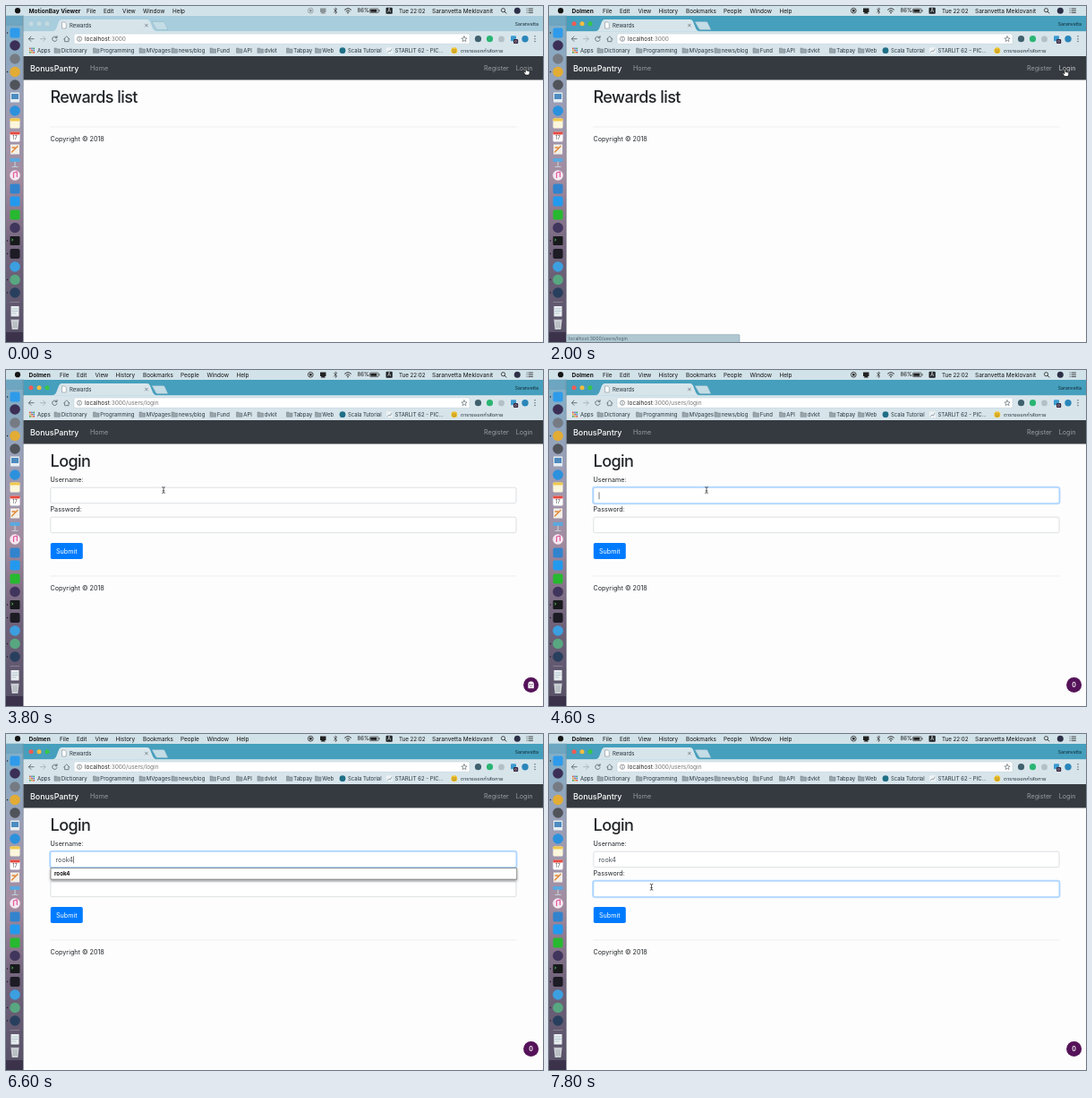
An HTML page for the animation above (8000 ms loop, 600 by 375 pixels).

```html
<!DOCTYPE html>
<html lang="en">
<head>
<meta charset="utf-8">
<title>Login demo</title>
<style>
  html, body { margin: 0; width: 100%; height: 100%; overflow: hidden; background: #fdfdfd; }
  svg { display: block; width: 100vw; height: 100vh; }
  text { font-family: Inter, Roboto, "Noto Sans", "Noto Sans Thai", sans-serif; white-space: pre; }
</style>
</head>
<body>
<svg id="stage" viewBox="0 0 600 375" xmlns="http://www.w3.org/2000/svg"></svg>
<script>
const STEP = 200, LOOP = 8000;
const INK = '#212529', FAINT = '#9a9da0';

// Markup helpers; text is placed by the middle of its capitals.
const text = (x, mid, s, size, fill = INK, more = '') =>
  `<text x="${x}" y="${mid + size * 0.36}" font-size="${size}" fill="${fill}" ${more}>${s}</text>`;
const rect = (x, y, w, h, fill, more = '') =>
  `<rect x="${x}" y="${y}" width="${w}" height="${h}" fill="${fill}" ${more}/>`;
const dot = (x, y, r, fill, more = '') => `<circle cx="${x}" cy="${y}" r="${r}" fill="${fill}" ${more}/>`;
const path = (d, fill, more = '') => `<path d="${d}" fill="${fill}" ${more}/>`;
const line = (d, color, w = 1, more = '') =>
  path(d, 'none', `stroke="${color}" stroke-width="${w}" stroke-linecap="round" stroke-linejoin="round" ${more}`);
const group = (id, body) => `<g id="${id}">${body}</g>`;

const defs = `<defs>
  <linearGradient id="wall" x1="0" y1="0" x2="0" y2="1">
    <stop offset="0" stop-color="#6ba7c2"/><stop offset=".25" stop-color="#8d91ab"/>
    <stop offset=".5" stop-color="#97798f"/><stop offset=".72" stop-color="#5c4a65"/>
    <stop offset="1" stop-color="#393149"/>
  </linearGradient>
  <filter id="drop" x="-5%" y="-20%" width="110%" height="160%">
    <feDropShadow dx="0" dy="1.5" stdDeviation="1.5" flood-opacity=".4"/>
  </filter>
</defs>`;

function dock() {
  const square = (y, c) => rect(4.5, y - 5.5, 11, 11, c, 'rx="2"');
  const round = (y, c) => dot(10, y, 5.8, c);
  const sheet = (y, c, top) => rect(4.5, y - 5.5, 11, 11, c, 'rx="1.5"') + rect(4.5, y - 5.5, 11, 3, top, 'rx="1"');
  return rect(0, 10, 20, 365, 'url(#wall)') + rect(0, 22, 19.3, 342, '#d9dbe6', 'opacity=".18"') +
    square(30, '#2e9bea') + round(44, '#3b2f55') + round(59, '#767b83') +
    round(73.5, '#e2ac35') + round(88, '#50545a') +
    rect(5, 96.5, 10, 11, '#e6edf2') + rect(6, 98, 8, 6, '#4d8cc0') +
    round(117, '#2c91dd') + sheet(131, '#fbf6dc', '#f1c84a') +
    sheet(146, '#fff', '#e5493f') + text(10, 147.5, '17', 5.5, '#444', 'text-anchor="middle"') +
    rect(5, 154.5, 10, 11, '#f2efe8') + line('M6.5 163L13 156.5M7 158H10', '#e28635', 1.4) +
    rect(4.5, 170, 11, 4, '#5aa8df') + line('M10 174V179M7 179.5H13', '#c5ccd3', 1.2) +
    round(189, '#f4e7f0') + line('M8.5 191.5V186L12.3 185.2V190.5', '#e4559a', 1.2) +
    square(204, '#3283cd') + square(218, '#2399ee') + square(233, '#27b92f') +
    round(247.5, '#40355c') + rect(4.5, 257, 11, 10, '#17191b', 'rx="1"') + line('M6.5 260L8 261L6.5 262', '#5fd36a', .7) +
    square(276.5, '#1d1b24') + round(291, '#3c9fe0') + round(305.5, '#58a780') + round(320, '#293f5e') +
    line('M5 330.5H15', '#a9a4b2', .5) +
    rect(5.5, 335, 9, 11.5, '#e8edf0') + line('M7 338H13M7 340.5H13M7 343H11', '#9fb5c0', .7) +
    path('M5.5 350H14.5L13.3 361H6.7Z', '#cfd4d8') + line('M5.3 350H14.7M8 352.5L8.5 359M10 352.5V359M12 352.5L11.5 359', '#9da3aa', .7) +
    [30, 73.5, 262, 276.5, 305.5, 320].map(y => dot(1.6, y, .7, '#1b1a22')).join('');
}

function menu(app, items) {
  return text(25.5, 5.3, app, 6.5, '#111', 'font-weight="700"') +
    items.map(([x, s]) => text(x, 5.3, s, 6.4, '#111')).join('');
}

function menuBar() {
  return rect(0, 0, 600, 10.7, '#d2e2e9') + dot(13, 5.2, 3.1, '#151515') +
    group('menuIdle', menu('MotionBay Viewer',
      [[90, 'File'], [109, 'Edit'], [130, 'View'], [153, 'Window'], [186, 'Help']])) +
    group('menuLive', menu('Dolmen', [[60, 'File'], [79, 'Edit'], [99.5, 'View'], [122.5, 'History'],
      [153, 'Bookmarks'], [195, 'People'], [224.5, 'Window'], [257.5, 'Help']])) +
    group('recorder', dot(340.3, 5.2, 2.9, 'none', 'stroke="#222" stroke-width=".8"') + rect(339, 3.9, 2.6, 2.6, '#222') +
      rect(351, 2.5, 6.5, 4.5, '#222') + path('M354.3 5L357 8.5H351.6Z', '#222')) +
    line('M366.5 3.5L369.8 7L368.2 8.5V2L369.8 3.5L366.5 7', '#222', .6) +
    line('M378.5 4.2Q382 1 385.5 4.2M380 5.8Q382 4 384 5.8', '#222', .9) + dot(382, 7.6, .8, '#222') +
    text(392.5, 5.3, '86%', 6, '#111') +
    rect(406.5, 3, 9.5, 4.6, 'none', 'rx=".8" stroke="#222" stroke-width=".6"') + rect(407.3, 3.8, 7, 3, '#222') + rect(416.6, 4.3, .8, 2, '#222') +
    rect(424.5, 1.7, 7.3, 7, '#20262a', 'rx="1"') + text(428.1, 5.2, 'A', 5.5, '#fff', 'text-anchor="middle"') +
    text(439, 5.3, 'Tue 22:02', 6.2, '#111') + text(476, 5.3, 'Saranvetta Meklovanit', 6.5, '#111') +
    dot(555.5, 4.7, 2.1, 'none', 'stroke="#222" stroke-width=".8"') + line('M557.1 6.3L558.9 8.1', '#222', .9) +
    dot(571.3, 5.2, 3.5, '#2d3048') +
    line('M584 3H588.5M584 5.2H588.5M584 7.4H588.5', '#222', .8) + line('M582 3H582.1M582 5.2H582.1M582 7.4H582.1', '#222', .8);
}

function bookmarks() {
  const folder = x => path(`M${x} 47H${x + 2.4}L${x + 3} 48H${x + 6.5}V52.3H${x}Z`, '#9aa6ac', 'stroke="#6d7a81" stroke-width=".5"');
  const names = [[54, 'Dictionary'], [97.5, 'Programming'], [149, 'MVpages'], [185, 'news/blog'], [228, 'Fund'],
    [257.5, 'API'], [281, 'dvkit'], [313.5, 'Tabpay'], [345.5, 'Web']];
  const hues = ['#d94b3d', '#e3a32f', '#3f9b54', '#3f7ed1'];
  let out = '';
  for (let i = 0; i < 9; i++) out += rect(26 + i % 3 * 2.2, 46.6 + (i / 3 | 0) * 2.2, 1.6, 1.6, hues[i * 3 % 4]);
  out += text(35, 49.7, 'Apps', 6, '#26323a');
  for (const [x, s] of names) out += folder(x) + text(x + 7.8, 49.7, s, 6, '#26323a');
  return out + dot(376, 49.7, 3.4, '#1f6f86') + text(382, 49.7, 'Scala Tutorial', 5.9, '#26323a') +
    rect(425, 46.3, 7, 7, '#eef2f4') + line('M426 52L428 50L429.4 51L431 48', '#6e8794', .7) +
    text(434.5, 49.7, 'STARLIT 62 - PIC...', 6, '#26323a') +
    dot(500.8, 49.7, 3.5, '#f0c22e') + dot(499.6, 49, .5, '#5a4510') + dot(502, 49, .5, '#5a4510') + line('M499 51Q500.8 52.3 502.6 51', '#5a4510', .5) +
    text(508, 49.7, 'ตารางออกกำลังกาย', 6, '#26323a');
}

function browser() {
  const bar = '#d7e5eb', icon = '#5b676d';
  const lights = (...c) => c.map((f, i) => dot(28 + i * 9, 19.7, 2.5, f)).join('');
  return rect(19.3, 11, 580.7, 364, '#fdfdfd') +
    group('frameIdle', rect(19.3, 10.7, 580.7, 18, '#a8cddd') + lights('#c4d9e2', '#c4d9e2', '#c4d9e2')) +
    group('frameLive', rect(19.3, 10.7, 580.7, 18, '#459fbd') + lights('#f25c54', '#f5bd3d', '#38c648')) +
    path('M163 17.5H175.5Q176.7 17.5 177.3 18.6L181 26.5H169.5Q168 26.5 167.3 25Z', '#c3dce5', 'stroke="#79a9bb" stroke-width=".4"') +
    path('M52 28.5Q55 28 56.2 25L59 17.5Q60 15 62 15H158Q160 15 161 17.5L164 25Q165.2 28 168 28.5Z', bar) +
    path('M62.5 18H65.7L67.2 19.5V25H62.5Z', '#fff', 'stroke="#6f7b81" stroke-width=".5"') +
    text(71, 21.6, 'Rewards', 6, '#26323a') + line('M155.5 20.2L158.3 23M158.3 20.2L155.5 23', icon, .7) +
    text(595, 20, 'Saranvetta', 5.2, '#12262f', 'text-anchor="end"') +
    rect(19.3, 28.3, 580.7, 28, bar) +
    line('M31 36.7H25.5M28 34L25.3 36.7L28 39.4', icon, .9) +
    line('M38.5 36.7H44M41.5 34L44.2 36.7L41.5 39.4', '#a5b3ba', .9) +
    line('M56.5 35A2.7 2.7 0 1 0 57 37.6M57 33.5V35.6H55', icon, .9) +
    line('M64.5 37L67.8 33.8L71 37M65.6 36.5V39.7H70V36.5', icon, .8) +
    rect(76, 31, 442, 11.3, '#fff', 'rx="1.6" stroke="#b9c9d0" stroke-width=".5"') +
    dot(82, 36.7, 2.6, 'none', 'stroke="#6a7378" stroke-width=".7"') + line('M82 36.5V38M82 35.2V35.3', '#6a7378', .7) +
    text(88, 36.7, 'localhost<tspan fill="#777">:3000<tspan id="urlPath"></tspan></tspan>', 6.5, '#222') +
    line('M512 33.7L512.9 35.8L515.1 36L513.4 37.4L514 39.6L512 38.4L510 39.6L510.6 37.4L508.9 36L511.1 35.8Z', '#657076', .7) +
    dot(527.5, 36.7, 3.6, '#40616d') + dot(540.5, 36.7, 3.6, '#2ab573') + dot(553.5, 36.9, 3.4, '#b5c0c5') +
    rect(564, 33.3, 6, 6, '#3b9bd0', 'rx="1"') + rect(567, 37, 5.2, 5, '#3a2740', 'rx="1"') + text(569.6, 39.5, '0', 4, '#fff', 'text-anchor="middle"') +
    dot(580, 36.7, 3.7, '#2a86ba') + [33.8, 36.7, 39.6].map(y => dot(591, y, .75, icon)).join('') +
    bookmarks() + line('M19.3 11V375', '#54616a', .4);
}

const heading = s => text(49.5, 102, s, 18, INK, 'font-weight="500" letter-spacing="-.55"');
const footer = y => line(`M49.5 ${y}H570`, '#e3e3e3', .6) + text(49.5, y + 13.5, 'Copyright © 2018', 7.2);
const field = (id, y) => rect(49, y - .5, 521.5, 18.5, 'none', `id="${id}Glow" rx="2.4" stroke="#bfdeff" stroke-width="2"`) +
  rect(49.8, y, 520.2, 17.5, '#fff', `id="${id}Box" rx="1.8" stroke-width=".6"`);

function page() {
  return rect(19.5, 56, 580.5, 26.5, '#343a40') +
    text(27, 69.6, 'BonusPantry', 8.9, '#fff', 'font-weight="500"') +
    text(94, 69.6, 'Home', 7.2, FAINT) + text(534, 69.6, 'Register', 7.2, FAINT) +
    text(569.7, 69.6, 'Login', 7.2, FAINT, 'id="loginLink"') +
    group('listPage', heading('Rewards list') + footer(135)) +
    group('loginPage', heading('Login') + text(49.5, 122, 'Username:', 7.2) + text(49.5, 155, 'Password:', 7.2) +
      field('user', 131.2) + field('pass', 164.2) + text(55.5, 140.3, '', 7.2, '#495057', 'id="typed"') +
      rect(0, 136.3, .6, 8, '#222', 'id="caret"') +
      rect(49.8, 193, 36, 18, '#007bff', 'rx="1.8"') + text(67.8, 202, 'Submit', 7.2, '#fff', 'text-anchor="middle"') +
      footer(230) + group('hints', '')) +
    group('badge', dot(586.6, 351.5, 8.5, '#551359') +
      group('ghost', path('M583.4 355.2V350.6Q583.4 347.6 586.6 347.6T589.8 350.6V355.2Z', '#fff') +
        dot(585.4, 351, .7, '#551359') + dot(587.8, 351, .7, '#551359') + line('M585.5 353.3H587.7', '#551359', .5)) +
      group('count', text(586.6, 351.5, '0', 7, '#fff', 'text-anchor="middle" font-weight="600"'))) +
    group('status', rect(19.5, 366.7, 193.5, 9, '#b0c8d2', 'rx="1" stroke="#7f99a4" stroke-width=".5"') +
      text(22, 370.7, 'localhost:3000/users/login', 5.2, '#4f626b'));
}

const cursors =
  group('arrow', path('M0 0V6.6L1.5 5.3L2.5 7.6L3.6 7.1L2.6 4.9H4.7Z', '#111', 'stroke="#fff" stroke-width=".5"')) +
  group('hand', path('M-.7 .5Q0 -.4 .7 .5V3L3.6 3.7Q4.4 4 4.2 5L3.5 8H-.6L-2.7 5Q-2.8 4 -1.8 4.3L-.7 5.2Z', '#fff', 'stroke="#111" stroke-width=".7"')) +
  group('beam', line('M-1.4 -3.4Q0 -3.4 0 -2.6V2.6Q0 3.4 -1.4 3.4M1.4 -3.4Q0 -3.4 0 -2.6M0 2.6Q0 3.4 1.4 3.4M-.8 .8H.8', '#222', .7));

stage.innerHTML = defs + dock() + browser() + page() + menuBar() + group('cursor', cursors);

const el = Object.fromEntries([...stage.querySelectorAll('[id]')].map(n => [n.id, n]));
const show = (id, on) => el[id].setAttribute('display', on ? 'inline' : 'none');

// Pointer stops: time, x, y.
const track = [[0, 581, 69], [200, 581, 69], [800, 543, 116], [1200, 543, 116], [1800, 576.6, 70.5],
  [2800, 576.6, 70.5], [3600, 176, 134], [6800, 176, 134], [7400, 114.5, 170.8], [8000, 114.5, 170.8]];
// Keystrokes: time, field value.
const keys = [[0, ''], [5000, 'r'], [5200, 'ro'], [5400, 'roo'], [5800, 'rook'], [6200, 'rook4']];
const accounts = [1, 4, 3, 2, 5].map(n => 'rook' + n);

function pointer(t) {
  const i = track.findIndex(p => p[0] > t);
  const [a, x0, y0] = track[i - 1], [b, x1, y1] = track[i];
  const u = (t - a) / (b - a), e = u * u * (3 - 2 * u);
  return [x0 + (x1 - x0) * e, y0 + (y1 - y0) * e];
}

function hintList(names) {
  if (!names.length) return '';
  return rect(50, 149.8, 520.8, names.length * 11.3 + 1, '#fff', 'stroke="#555" stroke-width=".6" filter="url(#drop)"') +
    names.map((s, i) => text(54, 156 + i * 11.25, s, 6.2, '#111', 'font-weight="700"')).join('');
}

function setFocus(id, on) {
  show(id + 'Glow', on);
  el[id + 'Box'].setAttribute('stroke', on ? '#80bdff' : '#c6ccd2');
}

function draw(t) {
  const live = t >= 200, login = t >= 2600;
  const onUser = t >= 4200 && t < 7200, onPass = t >= 7200;
  const [x, y] = pointer(t);
  const onLink = x > 566 && y < 78;
  const inField = login && x < 570 && (y > 131 && y < 149 || y > 164 && y < 182);

  show('menuIdle', !live);
  show('menuLive', live);
  show('frameIdle', !live);
  show('frameLive', live);
  el.recorder.setAttribute('opacity', live ? 1 : .4);

  show('listPage', !login);
  show('loginPage', login);
  show('status', live && !login && onLink && t > 1000);
  el.urlPath.textContent = login ? '/users/login' : '';
  el.loginLink.setAttribute('fill', onLink && t > 1000 ? '#c9cbcd' : FAINT);
  show('badge', t >= 2800);
  show('ghost', t < 4200);
  show('count', t >= 4200);

  const value = keys.filter(k => k[0] <= t).pop()[1];
  el.typed.textContent = value;
  setFocus('user', onUser);
  setFocus('pass', onPass);
  show('caret', onUser);
  if (onUser) el.caret.setAttribute('x', 55.7 + (value ? el.typed.getComputedTextLength() : 0));
  el.hints.innerHTML = hintList(value && t < 7000 ? accounts.filter(s => s.startsWith(value)) : []);

  show('cursor', t < 5000 || t >= 6800);
  el.cursor.setAttribute('transform', `translate(${x} ${y})`);
  show('hand', onLink);
  show('beam', !onLink && inField);
  show('arrow', !onLink && !inField);
}

const start = performance.now();
function tick() {
  const t = (performance.now() - start) % LOOP;
  draw(Math.floor(t / STEP) * STEP);
  requestAnimationFrame(tick);
}
tick();
</script>
</body>
</html>
```
